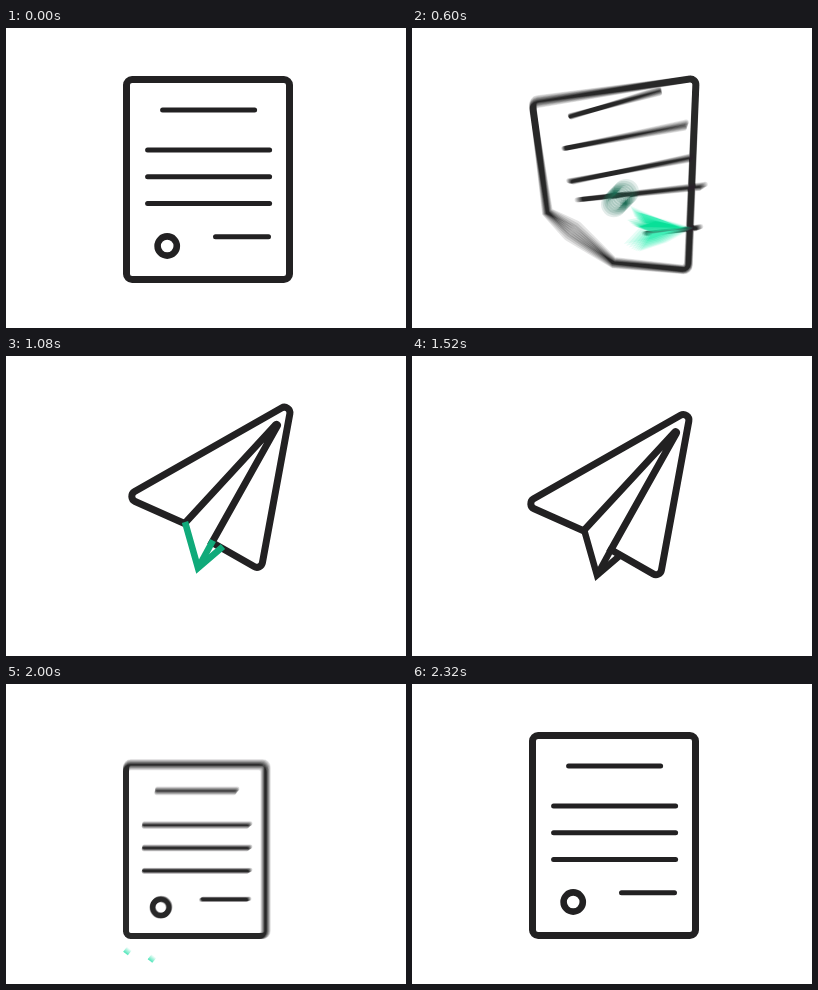
Recreate the animation shown at these times as an HTML page with a canvas. Size 400x300 px, loop 3480 ms.

```html
<!DOCTYPE html>
<html lang="en">
<head>
<meta charset="utf-8">
<title>Document to paper plane</title>
<style>
html, body { margin: 0; width: 100%; height: 100%; overflow: hidden; background: #fff; }
canvas { display: block; width: 400px; height: 300px; }
</style>
</head>
<body>
<canvas id="stage" width="400" height="300"></canvas>
<script>
const W = 400, H = 300, LOOP = 3480, STEP = 40, SHUTTER = 16, SAMPLES = 8;
const INK = [34, 33, 34], GREEN = [16, 170, 122];
const LEFT = 120.5, TOP = 51.5, RIGHT = 283.5, BOTTOM = 251.5;

// Matching corners of the sheet and the folded plane
const SHEET = [[LEFT, TOP], [RIGHT, TOP], [RIGHT, BOTTOM], [200, BOTTOM], [LEFT, BOTTOM], [LEFT, 190]];
const PLANE = [[119, 141], [286, 46], [255, 214.5], [206, 186.5], [275.5, 62.5], [178.5, 167.5]];

// The dart waits at the second point, then passes one point every 80 ms
const FLIGHT = [[78, 308], [103, 275], [129, 239], [190, 188], [275, 200],
  [338, 185], [350, 128], [352, 75], [368, 170], [280, 262], [193, 225]];

const out = document.getElementById('stage').getContext('2d');
const layer = document.createElement('canvas');
layer.width = W;
layer.height = H;
const g = layer.getContext('2d');

const span = (t, a, b) => Math.min(1, Math.max(0, (t - a) / (b - a)));
const mix = (a, b, k) => a + (b - a) * k;
const mixAll = (a, b, k) => a.map((v, i) => mix(v, b[i], k));
const inOut = u => u < .5 ? 4 * u ** 3 : 1 - 4 * (1 - u) ** 3;
const outQuart = u => 1 - (1 - u) ** 4;
const rgb = c => `rgb(${c.map(Math.round)})`;

function trace(points) {
  g.beginPath();
  points.forEach(([x, y]) => g.lineTo(x, y));
}

function ink(width, color, cap = 'butt') {
  g.lineWidth = width;
  g.lineCap = cap;
  g.strokeStyle = color;
  g.stroke();
}

function blade(color, ...points) {
  trace(points);
  g.fillStyle = color;
  g.fill();
}

function outline(fold) {
  const p = SHEET.map((a, i) => mixAll(a, PLANE[i], fold));
  const radius = i => i < 3 ? 5.6 : i === 4 ? mix(5.6, 1, fold) : 0;
  g.beginPath();
  g.moveTo(...mixAll(p[5], p[0], .5));
  p.forEach(([x, y], i) => g.arcTo(x, y, ...p[(i + 1) % p.length], radius(i)));
  g.closePath();
  ink(7, rgb(INK));
}

// Title, three text rules, signature rule and seal, blown to the upper right
function content(t, blow) {
  const gone = span(t, 740, 890) ** 2;
  if (gone === 1) return;
  g.globalAlpha = 1 - .13 * blow;
  for (let i = 0; i < 5; i++) {
    const odd = i % 2;
    const half = i === 0 ? 46 : i === 4 ? 26.5 : 61;
    const x = i === 4 ? 236 : 202.6;
    const y = i ? 95.3 + 26.7 * i + (i === 4 ? 6.6 : 0) : 82;
    g.save();
    g.translate(mix(x, 204 + 30 * i + 9 * odd, blow), mix(y, 58 + 32 * i - 18 * odd, blow));
    g.rotate((9 * i - 60 + 10 * odd) * blow * Math.PI / 180);
    trace([[mix(-half, half, gone), 0], [half, 0]]);
    ink(5, rgb(INK), 'round');
    g.restore();
  }
  g.beginPath();
  g.arc(mix(161.2, 337.2, blow), mix(218, 37.7, blow), 9.6 * (1 - gone), 0, 7);
  ink(6.6 * (1 - gone), rgb(mixAll(INK, GREEN, span(t, 400, 800))));
  g.globalAlpha = 1;
}

// Catmull-Rom point at path position s
function flightAt(s) {
  const last = FLIGHT.length - 1;
  const i = Math.min(last - 1, Math.max(0, Math.floor(s))), u = s - i;
  const [a, b, c, d] = [-1, 0, 1, 2].map(k => FLIGHT[Math.min(last, Math.max(0, i + k))]);
  return b.map((v, n) => v + u / 2 * (c[n] - a[n] +
    u * (2 * a[n] - 5 * v + 4 * c[n] - d[n] + u * (3 * (v - c[n]) + d[n] - a[n]))));
}

function dart(t) {
  if (t < 40 || t >= 1080) return;
  const s = t < 360 ? span(t, 40, 200) : 1 + (t - 360) / 80;
  const [x, y] = flightAt(s), [x0, y0] = flightAt(s - .05), [x1, y1] = flightAt(s + .05);
  const size = mix(.8, 1, span(t, 440, 760)) * (1 - span(t, 900, 1080));
  g.save();
  g.translate(x, y);
  g.rotate(Math.atan2(y1 - y0, x1 - x0));
  g.scale(size, size);
  blade('#3debb6', [0, 0], [-58, -19], [-52, -7]);
  blade('#3debb6', [0, 0], [-30, 15], [-61, 24], [-46, 5]);
  blade('#05df97', [0, 0], [-40, -9], [-60, -3], [-44, 3]);
  g.restore();
}

function keel(t) {
  const grow = span(t, 980, 1080);
  if (!grow) return;
  const color = rgb(mixAll(GREEN, INK, span(t, 1120, 1440)));
  const tip = [192, 212];
  for (const [length, points] of [[82, [[179, 166], tip, [217, 190.5]]], [32, [tip, [207, 184.5]]]]) {
    g.setLineDash([length * grow, 200]);
    trace(points);
    ink(6.5, color);
  }
  g.setLineDash([]);
}

function trails(t) {
  const ends = [[1710, 1850], [1800, 2010]].map(([a, b]) => 75 * (1 - span(t, a, b)));
  if (ends[0] === ends[1]) return;
  for (const [x, y] of [[119.5, 269.5], [144, 277]]) {
    trace(ends.map(d => [x + .62 * d, y - .78 * d]));
    ink(6, '#5ce8bf');
  }
}

function foldingSheet(t) {
  const fold = inOut(span(t, 440, 840));
  const settle = inOut(span(t, 1100, 1520));
  const away = 430 * span(t, 1680, 1900) ** 2;
  g.save();
  g.translate(.7 * away - 7 * settle, 7.3 * settle - .72 * away);
  outline(fold);
  content(t, fold / .968);
  keel(t);
  g.restore();
}

function newSheet(t) {
  const size = outQuart(span(t, 1800, 2320));
  g.save();
  g.translate(117 * (1 - size), 255 * (1 - size));
  g.scale(size, size);
  outline(0);
  content(0, 0);
  g.restore();
}

function scene(t) {
  g.clearRect(0, 0, W, H);
  if (t < 1900) foldingSheet(t);
  dart(t);
  trails(t);
  if (t > 1800) newSheet(t);
}

function frame(now) {
  const t = Math.floor(now % LOOP / STEP) * STEP;
  const moving = t > 360 && t < 1080 || t > 1680 && t < 2240;
  const n = moving ? SAMPLES : 1;
  out.clearRect(0, 0, W, H);
  out.globalCompositeOperation = 'lighter';
  out.globalAlpha = 1 / n;
  // Averaging moments within the shutter gives motion blur
  for (let i = 0; i < n; i++) {
    scene(t + ((i + .5) / n - .5) * SHUTTER);
    out.drawImage(layer, 0, 0);
  }
  requestAnimationFrame(next => frame(next - start));
}

const start = performance.now();
frame(0);
</script>
</body>
</html>
```
